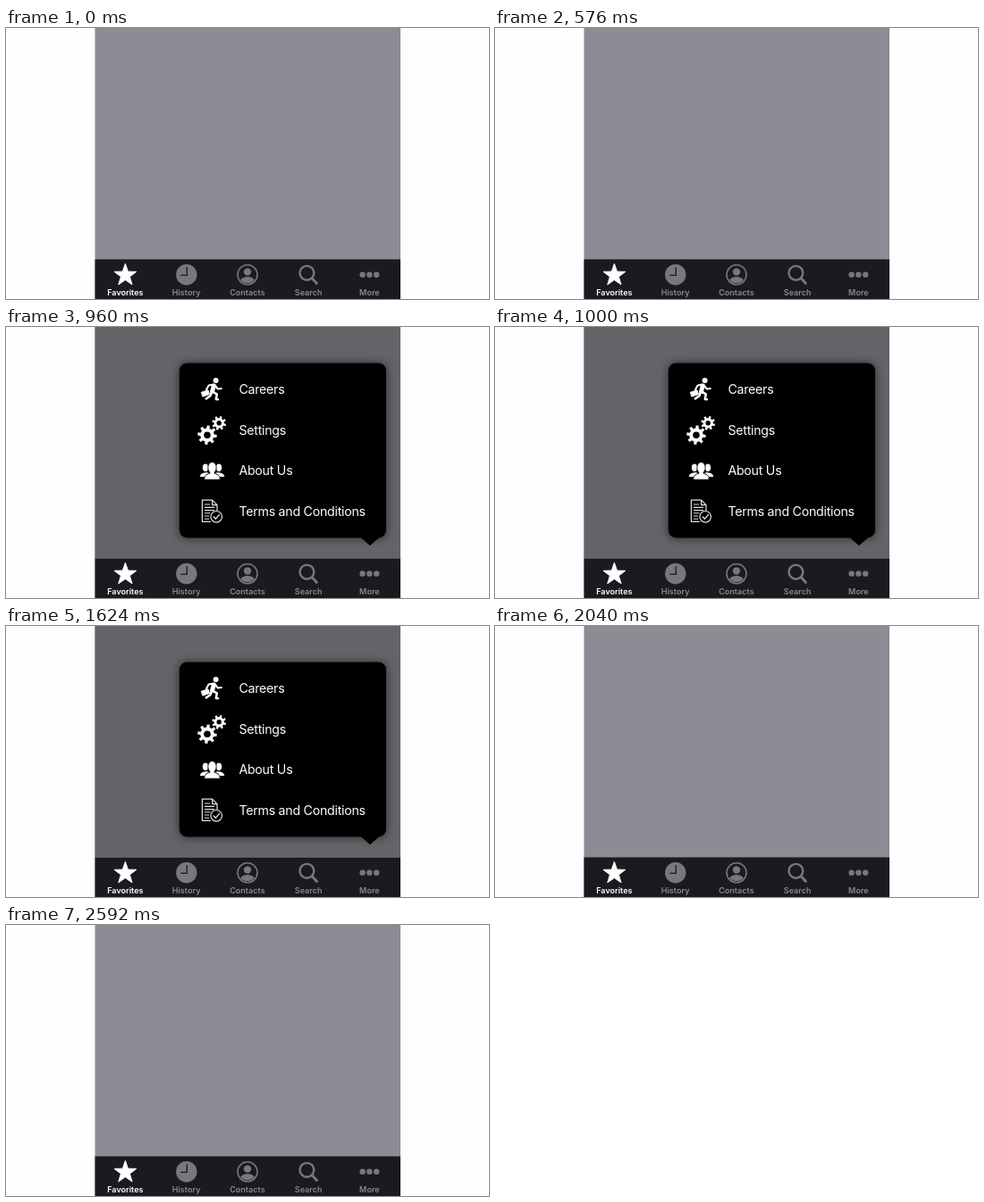
An HTML page for the animation above (2.96 s loop, 540 by 304 pixels).

```html
<!DOCTYPE html>
<html lang="en">
<head>
<meta charset="utf-8">
<title>Tab bar with popover menu</title>
<style>
  html, body { margin: 0; width: 100%; height: 100%; overflow: hidden; background: #fefdff; }
  svg { display: block; width: 100vw; height: 100vh; }
  text { font-family: Inter, Roboto, sans-serif; }
  .tab text { font-size: 9px; font-weight: 600; text-anchor: middle; letter-spacing: .03px; fill: #8b898e; }
  .tab .on { fill: #fff; }
  .menu text { font-size: 14.2px; letter-spacing: -.26px; fill: #fff; }
  #open { opacity: 0; }
</style>
</head>
<body>
<svg viewBox="0 0 540 304">
  <defs>
    <filter id="soft" x="-20%" y="-20%" width="140%" height="140%">
      <feGaussianBlur stdDeviation="5"/>
    </filter>
    <clipPath id="screen"><rect x="99.5" y="0" width="341.5" height="260"/></clipPath>
  </defs>

  <rect width="540" height="304" fill="#fefdff"/>
  <rect x="99.5" width="341.5" height="304" fill="#8d8b93"/>
  <rect x="99.5" y="259.5" width="341.5" height="44.5" fill="#1c1a20"/>

  <g class="tab" fill="#79777b">
    <path id="star" fill="#fff" stroke="#fff" stroke-width="1" stroke-linejoin="round"/>
    <circle cx="201.8" cy="276.8" r="11.7"/>
    <path d="M202.3 268.2V277.4H195.3" fill="none" stroke="#1c1a20" stroke-width="1.3"/>
    <circle cx="270" cy="276.8" r="11" fill="none" stroke="#79777b" stroke-width="1.6"/>
    <circle cx="270" cy="273.6" r="4.2"/>
    <path d="M262.2 282.8C263.6 280.2 266.8 279 270 279S276.4 280.2 277.8 282.8C276 285.1 273.2 286.3 270 286.3S264 285.1 262.2 282.8Z"/>
    <circle cx="336.4" cy="274.8" r="7.9" fill="none" stroke="#79777b" stroke-width="2.4"/>
    <path d="M342.2 280.8L347.4 286.4" stroke="#79777b" stroke-width="3" stroke-linecap="round"/>
    <circle cx="398.6" cy="276.8" r="3.2"/>
    <circle cx="406.4" cy="276.8" r="3.2"/>
    <circle cx="414.2" cy="276.8" r="3.2"/>
    <g id="labels"></g>
  </g>

  <g id="open">
    <rect x="99.5" width="341.5" height="259.5" fill="#656368"/>
    <g clip-path="url(#screen)">
      <rect x="193" y="40" width="233" height="198" rx="9" filter="url(#soft)" opacity=".5"/>
    </g>
    <rect x="193.8" y="40.4" width="231.2" height="196" rx="8.5"/>
    <path d="M396.5 236L407 245.2L417.5 236Z"/>

    <g class="menu" id="items"></g>

    <!-- running figure with a case -->
    <g fill="none" stroke="#fff" stroke-linecap="round" stroke-linejoin="round">
      <circle cx="234.6" cy="60" r="3" fill="#fff" stroke="none"/>
      <path d="M232.3 66L230.6 72.2" stroke-width="5"/>
      <path d="M231.8 64.6L226.6 65.4L224 70.2" stroke-width="2"/>
      <path d="M234 65.6L236.6 69.4L240.8 69" stroke-width="2"/>
      <path d="M231.2 72.6L235.8 75.4L234.8 81L237 81.2" stroke-width="2.5"/>
      <path d="M230 73.2L228.4 77.2L223.8 80.4" stroke-width="2.5"/>
      <path d="M218.6 73.2L226 70.8L227.6 75.4L220.2 78Z" fill="#fff" stroke-width="1"/>
    </g>

    <path id="gears" fill="#fff" fill-rule="evenodd"/>

    <!-- group of three -->
    <g fill="#fff" stroke="#000" stroke-width=".9">
      <g id="sides">
        <path d="M216.6 168.6C216.6 164.8 218.2 164.2 221.2 163.2L224 162.6L227 163.4C229 164.4 229.6 165.4 229.6 168.6Z"/>
        <ellipse cx="223" cy="157.8" rx="3.7" ry="4.7"/>
        <path d="M244.4 168.6C244.4 164.8 242.8 164.2 239.8 163.2L237 162.6L234 163.4C232 164.4 231.4 165.4 231.4 168.6Z"/>
        <ellipse cx="238" cy="157.8" rx="3.7" ry="4.7"/>
      </g>
      <path d="M221.8 171.2C221.8 166.6 223.4 165.8 227.6 164.3L230.5 163L233.4 164.3C237.6 165.8 239.2 166.6 239.2 171.2Z"/>
      <ellipse cx="230.5" cy="157.8" rx="4.7" ry="6.3"/>
      <path d="M228.4 162H232.6V165.4L230.5 167.2L228.4 165.4Z" stroke="none"/>
    </g>

    <!-- page with a check mark -->
    <g fill="none" stroke="#e2e2e2" stroke-width="1.2" stroke-linejoin="round">
      <path d="M228.8 218.4H219.4V194.2H230.6L236 199.6V206"/>
      <path d="M230.6 194.2V199.6H236"/>
      <path d="M222 199H228M222 202.4H233M222 205.6H233M222 208.8H228.4M222 212H227M222 215.2H227.4" stroke-width="1.1"/>
      <circle cx="235.2" cy="212.8" r="6.3" fill="#000"/>
      <path d="M232.2 213L234.4 215.2L238.4 210.6" stroke-width="1.3" stroke-linecap="round"/>
    </g>
  </g>
</svg>

<script>
const $ = id => document.getElementById(id);
const polar = (x, y, r, a) => `${(x + r * Math.cos(a)).toFixed(2)} ${(y + r * Math.sin(a)).toFixed(2)}`;
const poly = pts => `M${pts.join('L')}Z`;

function addText(parent, x, y, value, cls) {
  const t = document.createElementNS('http://www.w3.org/2000/svg', 'text');
  t.setAttribute('x', x);
  t.setAttribute('y', y);
  if (cls) t.setAttribute('class', cls);
  t.textContent = value;
  parent.append(t);
}

function star(x, y, outer, inner) {
  return poly(Array.from({ length: 10 }, (_, i) =>
    polar(x, y, i % 2 ? inner : outer, (i / 5 - .5) * Math.PI)));
}

function gear(x, y, r, root, hole, teeth, turn) {
  const pts = [];
  const step = 2 * Math.PI / teeth;
  for (let i = 0; i < teeth; i++) {
    const a = i * step + turn;
    pts.push(polar(x, y, root, a - step * .27), polar(x, y, r, a - step * .19),
             polar(x, y, r, a + step * .19), polar(x, y, root, a + step * .27));
  }
  return poly(pts) +
    `M${x - hole} ${y}a${hole} ${hole} 0 1 0 ${2 * hole} 0a${hole} ${hole} 0 1 0 ${-2 * hole} 0Z`;
}

$('star').setAttribute('d', star(133.4, 277.4, 13, 5.2));
$('gears').setAttribute('d',
  gear(225, 121.2, 10.8, 7.8, 3.8, 8, .12) + gear(238.2, 107.8, 8, 5.7, 2.7, 8, .3));

['Favorites', 'History', 'Contacts', 'Search', 'More'].forEach((name, i) =>
  addText($('labels'), 133.4 + i * 68.25, 300, name, i ? '' : 'on'));

['Careers', 'Settings', 'About Us', 'Terms and Conditions'].forEach((name, i) =>
  addText($('items'), 260.4, 75.2 + i * 45.6, name));

// The menu appears and leaves at once.
const loop = 2960, show = 960, hide = 2040;
const steps = [[0, 0], [show, 1], [hide, 0], [loop, 0]];
$('open').animate(
  steps.map(([t, opacity]) => ({ offset: t / loop, opacity, easing: 'steps(1, end)' })),
  { duration: loop, iterations: Infinity });
</script>
</body>
</html>
```
